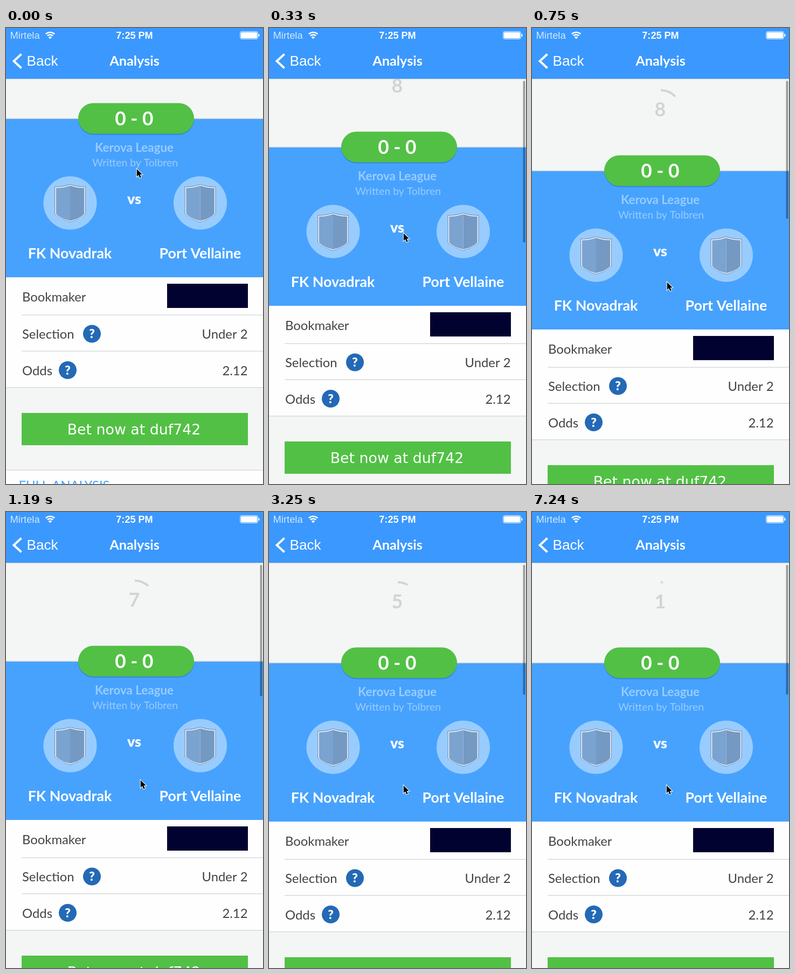
Recreate the animation shown at these times as an HTML page with a canvas. Size 477x847 px, loop 8000 ms.

```html
<!DOCTYPE html>
<html lang="en">
<head>
<meta charset="utf-8">
<title>Analysis</title>
<style>
html, body { margin: 0; width: 100%; height: 100%; overflow: hidden; background: #f4f6f5; }
canvas { display: block; width: 477px; height: 847px; }
</style>
</head>
<body>
<canvas id="stage" width="477" height="847"></canvas>
<script>
const c = document.getElementById('stage').getContext('2d');
const LOOP = 8000, W = 477, H = 847;
const LATO = 'Lato, sans-serif', SANS = '"Liberation Sans", Arial, sans-serif';
const BLUE = '#47a2fe', GREEN = '#52c045', PALE = '#98ccff', RULE = '#d9dbdb', INK = '#434345';

// time, pull distance, pointer x, pointer y
const DRAG = [
  [0, 0, 242, 261],
  [330, 53, 249, 380],
  [750, 97.3, 250, 471],
  [1190, 109, 249, 497],
  [1490, 111, 249, 504],
  [1900, 112, 249, 507]
];
const TICKS = [60, 1070, 2130, 3080, 4080, 5090, 6050, 7070];

function slope(i, k) {
  const a = DRAG[Math.max(i - 1, 0)], b = DRAG[Math.min(i + 1, DRAG.length - 1)];
  return (b[k] - a[k]) / (b[0] - a[0]);
}

function drag(t, k) {
  const end = DRAG.length - 1;
  if (t < 60) return DRAG[0][k];
  if (t >= DRAG[end][0]) return DRAG[end][k];
  const i = DRAG.findIndex(p => p[0] > t) - 1;
  const a = DRAG[i], b = DRAG[i + 1], h = b[0] - a[0], u = (t - a[0]) / h;
  const u2 = u * u, u3 = u2 * u;
  return a[k] * (2 * u3 - 3 * u2 + 1) + b[k] * (3 * u2 - 2 * u3)
    + h * (slope(i, k) * (u3 - 2 * u2 + u) + slope(i + 1, k) * (u3 - u2));
}

function rect(x, y, w, h, color) {
  c.fillStyle = color;
  c.fillRect(x, y, w, h);
}

function round(x, y, w, h, r, color) {
  c.beginPath();
  c.roundRect(x, y, w, h, r);
  c.fillStyle = color;
  c.fill();
}

function disc(x, y, r, color) {
  c.beginPath();
  c.arc(x, y, r, 0, 7);
  c.fillStyle = color;
  c.fill();
}

function text(s, x, y, size, color, align = 'left', weight = 400, family = LATO) {
  c.font = `${weight} ${size}px ${family}`;
  c.textAlign = align;
  c.fillStyle = color;
  c.fillText(s, x, y);
}

function stroke(color, width) {
  c.strokeStyle = color;
  c.lineWidth = width;
  c.stroke();
}

function shieldPath(inset) {
  const w = 29 - inset, top = -35 + inset, side = -30.5 + inset, base = 36 - inset;
  c.beginPath();
  c.moveTo(0, top);
  c.quadraticCurveTo(w * 0.5, side, w, side);
  c.lineTo(w, 20);
  c.quadraticCurveTo(w * 0.8, 28, 0, base);
  c.quadraticCurveTo(-w * 0.8, 28, -w, 20);
  c.lineTo(-w, side);
  c.quadraticCurveTo(-w * 0.5, side, 0, top);
  c.closePath();
}

function crest(x) {
  disc(x, 325, 49.5, PALE);
  c.save();
  c.translate(x, 325);
  shieldPath(0);
  c.fillStyle = '#7593b6';
  c.fill();
  shieldPath(1.2);
  c.fillStyle = '#f2f7fc';
  c.fill();
  shieldPath(2.8);
  c.clip();
  rect(-30, -40, 30, 80, '#7ba3d0');
  rect(0, -40, 30, 80, '#7499c3');
  c.restore();
}

function help(x, y) {
  disc(x, y, 16.5, '#2469b5');
  text('?', x, y + 8, 23, '#fff', 'center', 900);
}

function countdown(t) {
  const n = TICKS.filter(k => k <= t).length;
  const left = 9 - n;
  const u = n ? Math.min((t - TICKS[n - 1]) / 200, 1) : 1;
  const ease = u * u * (3 - 2 * u);
  const sweep = (left + 1 - ease) * Math.PI / 30;
  text(left, 238, 67, 35.8, '#d2d4d3', 'center', 700);
  c.beginPath();
  c.arc(239, 54.5, 36, -Math.PI / 2, -Math.PI / 2 + sweep);
  stroke('#d2d4d3', 4);
}

function match() {
  rect(0, 167.5, W, 1.5, '#cfd6db');
  rect(0, 169, W, 294, BLUE);
  round(134, 141.4, 215, 57, 28.5, '#3585dc');
  round(134, 139.4, 215, 57, 28.5, GREEN);
  text('0 - 0', 237.8, 180.8, 35.3, '#fff', 'center', 700);
  text('Kerova League', 238, 230, 22.4, PALE, 'center', 700);
  text('Written by Tolbren', 239.5, 257, 19.4, PALE, 'center');
  crest(119);
  crest(360.5);
  text('vs', 238, 327, 26.8, '#fff', 'center', 900);
  text('FK Novadrak', 118.5, 428, 26.8, '#fff', 'center', 700);
  text('Port Vellaine', 360.5, 428, 26.8, '#fff', 'center', 700);
}

function details() {
  rect(0, 463, W, 204, '#fefefe');
  rect(29, 532.5, 448, 1.5, RULE);
  rect(29, 599.5, 448, 1.5, RULE);
  rect(0, 667, W, 1.5, RULE);
  text('Bookmaker', 30, 508, 23.85, INK);
  rect(299, 475, 150, 45, '#020230');
  text('Selection', 30, 577, 23.85, INK);
  help(159.5, 568);
  text('Under 2', 448.5, 577, 23.85, INK, 'right');
  text('Odds', 30, 644.5, 23.85, INK);
  help(114.5, 635.5);
  text('2.12', 448.5, 644.5, 23.85, INK, 'right');
  rect(29, 715, 420, 60, GREEN);
  text('Bet now at duf742', 237.5, 755, 26.8, '#fff', 'center', 400, '"DejaVu Sans", sans-serif');
  rect(0, 820.5, W, 60, '#fefefe');
  rect(0, 820.5, W, 1.5, RULE);
  text('FULL ANALYSIS', 23.5, 857.5, 23.85, BLUE);
}

function header() {
  rect(0, 0, W, 94, '#3a98fe');
  rect(0, 94, W, 1, '#a5bfdb');
  text('Mirtela', 7.5, 20, 18.4, '#d3e8ff', 'left', 400, SANS);
  for (const r of [12, 7.6]) {
    c.beginPath();
    c.arc(82, 20, r, -Math.PI * 0.74, -Math.PI * 0.26);
    stroke('#fff', 2.5);
  }
  c.beginPath();
  c.moveTo(82, 20.5);
  c.arc(82, 20.5, 4.8, -Math.PI * 0.75, -Math.PI * 0.25);
  c.fillStyle = '#fff';
  c.fill();
  text('7:25 PM', 238.5, 20, 18.1, '#fff', 'center', 700, SANS);
  c.beginPath();
  c.roundRect(434.7, 6.7, 32.6, 13.6, 2.5);
  stroke('#fff', 1);
  round(436, 8, 30, 11, 1.5, '#fff');
  round(468.5, 11, 2, 5, 1, '#fff');
  c.beginPath();
  c.moveTo(28.5, 48.5);
  c.lineTo(14.5, 61.5);
  c.lineTo(28.5, 74.5);
  stroke('#fff', 4);
  text('Back', 38.5, 70, 26.2, '#fff', 'left', 400, SANS);
  text('Analysis', 238.5, 70, 25.3, '#fff', 'center', 700);
}

function pointer(x, y) {
  c.save();
  c.translate(x, y);
  c.beginPath();
  c.moveTo(0.8, 1);
  for (const [px, py] of [[0.8, 15], [4, 12], [6.4, 17.4], [8.8, 16.3], [6.5, 11.2], [10.8, 11]]) c.lineTo(px, py);
  c.closePath();
  stroke('#fff', 2);
  c.fillStyle = '#000';
  c.fill();
  c.restore();
}

function draw(t) {
  const pull = Math.round(drag(t, 1));
  rect(0, 0, W, H, '#f4f6f5');
  c.save();
  c.translate(0, pull);
  countdown(t);
  match();
  details();
  c.restore();
  header();
  if (t >= 60) round(471.5, 98, 4, 353.5 - pull, 2, 'rgba(0,0,0,.36)');
  pointer(drag(t, 2), drag(t, 3));
}

const start = performance.now();
function frame() {
  draw((performance.now() - start) % LOOP);
  requestAnimationFrame(frame);
}
frame();
</script>
</body>
</html>
```
